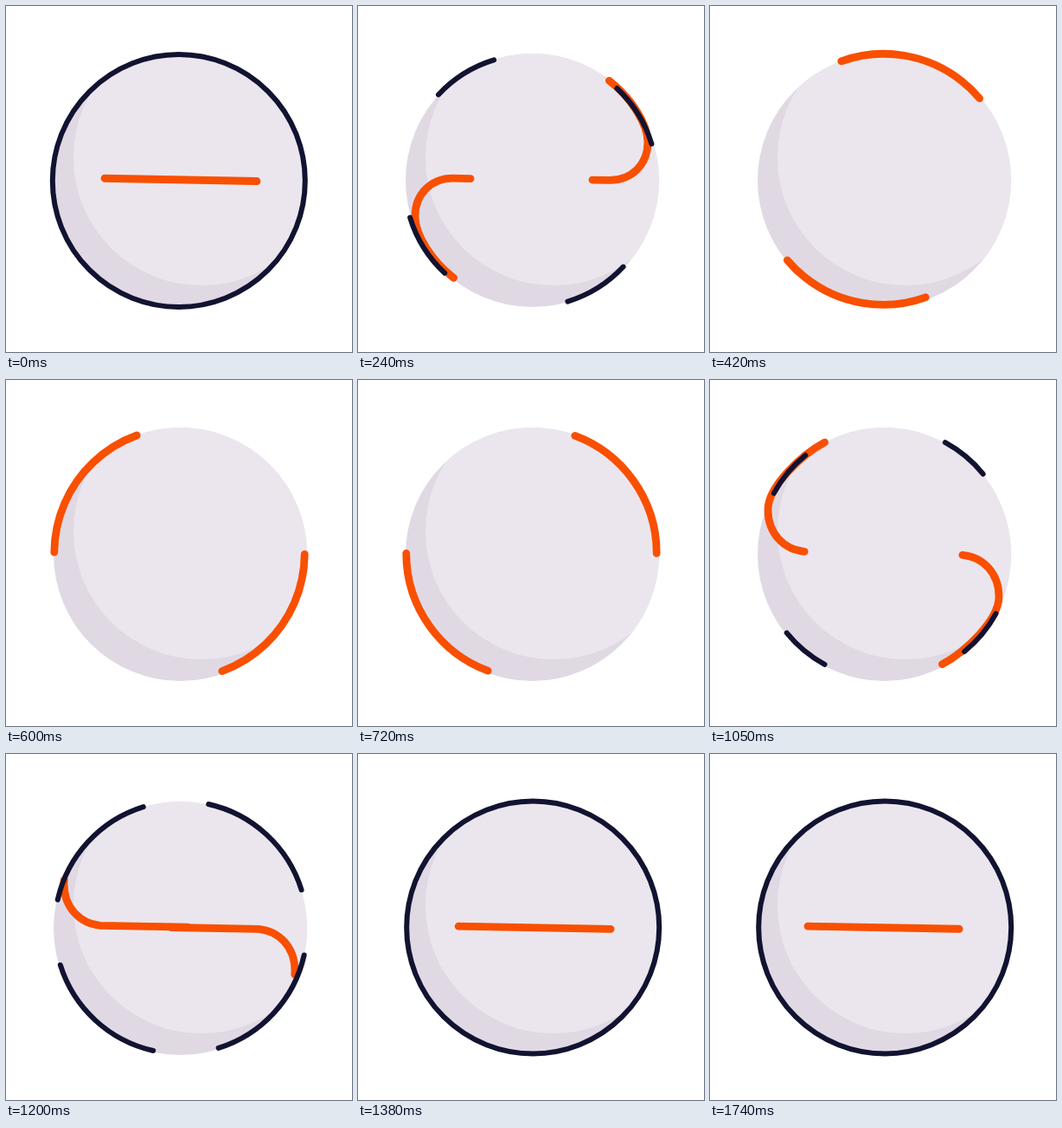
An HTML page that plays this animation: 400x400 px, repeating every 4860 ms.

```html
<!DOCTYPE html>
<html lang="en">
<head>
<meta charset="utf-8">
<title>Minus</title>
<style>
  html, body { margin: 0; width: 100%; height: 100%; overflow: hidden; background: #fff; }
  svg { display: block; width: 100%; height: 100%; }
  .ring { fill: none; stroke: #121331; stroke-width: 6; stroke-linecap: round; }
  .bar { fill: none; stroke: #f94f00; stroke-width: 8.8; stroke-linecap: round; }
</style>
</head>
<body>
<svg viewBox="0 0 400 400">
  <defs>
    <clipPath id="disc"><circle cx="201.5" cy="201.5" r="146.5"/></clipPath>
    <!-- out along the bar, round the rim, back along the bar -->
    <path id="route" d="M290 202.5 L110 199.2 C84 199 66 218 66 243 C66 265 86 295 109.6 313.5
      A145 145 0 1 0 132.7 72 C108 85 67 122 67 150 C67 177 85 196 109 198.3 L288 201.5"/>
  </defs>
  <circle cx="201.5" cy="201.5" r="146.5" fill="#e0d9e4"/>
  <circle cx="226" cy="175" r="148" fill="#ebe6ed" clip-path="url(#disc)"/>
  <use id="barA" class="bar" href="#route"/>
  <use id="barB" class="bar" href="#route" transform="rotate(180 200.5 200.3)"/>
  <circle id="ringOut" class="ring" cx="199.8" cy="202" r="146" pathLength="360"/>
  <circle id="ringIn" class="ring" cx="202.2" cy="200.5" r="146" pathLength="360"/>
</svg>
<script>
const LOOP = 4860, STEP = 30, BAR = 176;
const el = id => document.getElementById(id);
const barA = el('barA'), barB = el('barB'), ringOut = el('ringOut'), ringIn = el('ringIn');
const end = el('route').getTotalLength() - BAR;

// [time in ms, distance travelled along the route]
const keys = [[0, 0], [240, 160], [600, 483], [840, 824], [1050, 958], [1380, end - 4], [1740, end]];
const slopes = keys.slice(1).map(([t, d], i) => (d - keys[i][1]) / (t - keys[i][0]));
const tangents = keys.map((_, i) => {
  const a = slopes[i - 1], b = slopes[i];
  return a && b ? 2 * a * b / (a + b) : 0;
});

// Smooth monotone curve through the keys
function travel(time) {
  const i = keys.findIndex(([t]) => t > time) - 1;
  if (i < 0) return end;
  const [t0, d0] = keys[i], [t1, d1] = keys[i + 1], h = t1 - t0, u = (time - t0) / h;
  return d0 + (d1 - d0) * u * u * (3 - 2 * u)
    + h * u * (1 - u) * (tangents[i] * (1 - u) - tangents[i + 1] * u);
}

function show(node, visible) {
  node.style.display = visible ? '' : 'none';
}

function dash(node, length, gap, start) {
  node.style.strokeDasharray = `${length} ${gap}`;
  node.style.strokeDashoffset = -start;
}

// Each quarter of the ring shrinks to the given angle as p goes from 0 to 1
function drawRing(node, p, angle) {
  const length = 90 * (1 - p);
  show(node, p < 1);
  if (p > 0) dash(node, length, 90 - length, angle * p);
  else node.style.strokeDasharray = 'none';
}

function draw(time) {
  const d = travel(time);
  dash(barA, BAR, 9999, d);
  dash(barB, BAR, 9999, d);
  show(barA, time < 1320);
  show(barB, time >= STEP);
  drawRing(ringOut, Math.min(1, time / 360), 64.5);
  drawRing(ringIn, Math.min(1, Math.max(0, (1320 - time) / 360)), 38);
}

const began = performance.now();
function frame() {
  const time = (performance.now() - began) % LOOP;
  draw(Math.floor(time / STEP) * STEP);
  requestAnimationFrame(frame);
}
frame();
</script>
</body>
</html>
```
